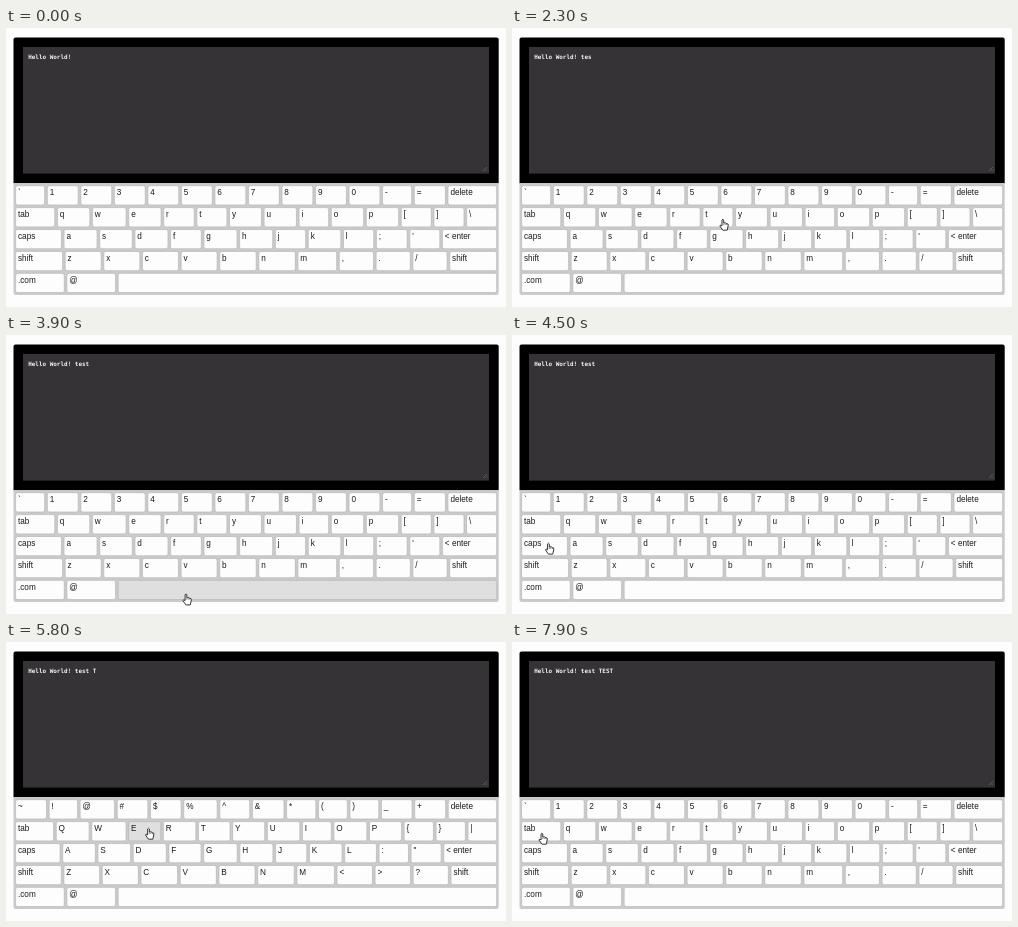
An HTML page with a canvas for the animation above (8 s loop, 500 px wide and 279 px high).

```html
<!DOCTYPE html>
<html lang="en">
<head>
<meta charset="utf-8">
<title>On-screen keyboard</title>
<style>
  html, body { margin: 0; width: 100%; height: 100%; overflow: hidden; background: #fdfdfd; }
  canvas { display: block; width: 500px; height: 279px; }
</style>
</head>
<body>
<canvas id="stage" width="500" height="279"></canvas>
<script>
const ctx = document.getElementById('stage').getContext('2d');
const LOOP = 8000, STEP = 100;
const LEFT = 9.6, TOP = 157.7, SPAN = 483.7, PITCH = 21.9, GAP = 2.6, KEY_H = 19.3;
const LABEL_SIZE = 8.2, KEY_FONT = 'px "Liberation Sans", Arial, sans-serif';

const LOWER = [
  ['`', ...'1234567890-=', 'delete'],
  ['tab', ...'qwertyuiop[]\\'],
  ['caps', ...'asdfghjkl;\'', '< enter'],
  ['shift', ...'zxcvbnm,./', 'shift'],
  ['.com', '@', ' ']
];
const UPPER = [
  ['~', ...'!@#$%^&*()_+', 'delete'],
  ['tab', ...'QWERTYUIOP{}|'],
  ['caps', ...'ASDFGHJKL:"', '< enter'],
  ['shift', ...'ZXCVBNM<>?', 'shift'],
  ['.com', '@', ' ']
];

// Keys take their label width plus an equal share of the spare room;
// the last row has two small keys and a space bar.
function layoutRow(labels, row) {
  ctx.font = LABEL_SIZE * 10 + KEY_FONT;
  let widths = labels.map(label => ctx.measureText(label).width / 10);
  if (row === 4) {
    const small = SPAN * 0.106;
    widths = [small, small, SPAN - 2 * small];
  } else {
    const share = (SPAN - widths.reduce((a, b) => a + b)) / labels.length;
    widths = widths.map(w => w + share);
  }
  let x = LEFT;
  return labels.map((label, i) => {
    const key = { label, x, y: TOP + row * PITCH, w: widths[i] - GAP };
    x += widths[i];
    return key;
  });
}
const layouts = [LOWER, UPPER].map(rows => rows.map(layoutRow).flat());
const findKey = label => layouts.flat().find(key => key.label === label);

const presses = [], stops = [];

function rest(from, to, x, y) {
  stops.push({ t: from, x, y }, { t: to, x, y });
}

function restOnKey(from, to, label, aimX, aimY) {
  const key = findKey(label);
  rest(from, to, key.x + key.w * aimX, key.y + aimY);
}

// Press keys at a steady beat, with the pointer arriving just before each one.
function type(labels, start, beat, aimX, aimY) {
  labels.forEach((label, i) => {
    const at = Math.round((start + beat * i) / STEP) * STEP;
    presses.push({ at, label });
    restOnKey(at - 2 * STEP, at + STEP, label, aimX, aimY);
  });
}

rest(0, 100, 60, 30);
rest(400, 500, 291, 226);
rest(700, 800, 446, 220);
type([...'test'], 1200, 420, 0.55, 11);
rest(3200, 3500, 178, 280);
type([' '], 3900, 0, 0.17, 13);
type(['caps', ...'TEST', 'caps'], 4700, 530, 0.51, 6);
restOnKey(7900, LOOP, 'tab', 0.43, 11);

function stateAt(t) {
  let text = 'Hello World! ', caps = 0, pressed = null;
  for (const { at, label } of presses) {
    if (t < at) break;
    if (t < at + STEP) pressed = label;
    else if (label === 'caps') caps = 1 - caps;
    else text += label;
  }
  return { text, caps, pressed };
}

function pointerAt(t) {
  const next = stops.findIndex(stop => stop.t > t);
  const a = stops[next - 1], b = stops[next];
  const u = (t - a.t) / (b.t - a.t), k = u * u * (3 - 2 * u);
  return [a.x + (b.x - a.x) * k, a.y + (b.y - a.y) * k];
}

function fillRound(x, y, w, h, r, color) {
  ctx.beginPath();
  ctx.roundRect(x, y, w, h, r);
  ctx.fillStyle = color;
  ctx.fill();
}

function drawScreen(text) {
  fillRound(7.5, 9.6, 485.2, 145.6, [2, 2, 0, 0], '#000');
  ctx.fillStyle = '#353335';
  ctx.fillRect(17, 19, 466, 126.6);
  ctx.fillStyle = '#f4f4f4';
  ctx.font = 'bold 5.96px "DejaVu Sans Mono", monospace';
  ctx.fillText(text, 22.2, 31);
  ctx.strokeStyle = '#777';
  ctx.lineWidth = 0.6;
  ctx.beginPath();
  for (const size of [4, 1.5]) {
    ctx.moveTo(481 - size, 143);
    ctx.lineTo(481, 143 - size);
  }
  ctx.stroke();
}

function drawKeys(keys, pressed) {
  fillRound(7.5, 155.2, 485.2, 111.8, [0, 0, 2, 2], '#cbcbcb');
  ctx.font = LABEL_SIZE + KEY_FONT;
  ctx.lineWidth = 0.7;
  ctx.strokeStyle = '#b6b6b6';
  for (const { label, x, y, w } of keys) {
    fillRound(x, y, w, KEY_H, 2, label === pressed ? '#dfdfdf' : '#fdfdfd');
    ctx.stroke();
    ctx.fillStyle = '#1a1a1a';
    ctx.fillText(label, x + 2.4, y + 9.4);
  }
}

function drawHand(x, y) {
  ctx.save();
  ctx.translate(x, y);
  ctx.beginPath();
  ctx.moveTo(2.6, 7.3);
  ctx.lineTo(2.6, 1.4);
  ctx.quadraticCurveTo(3.5, -0.2, 4.3, 1.4);
  ctx.lineTo(4.3, 4.4);
  ctx.quadraticCurveTo(6.5, 3.6, 7.4, 5.2);
  ctx.quadraticCurveTo(8.9, 4.9, 8.9, 6.3);
  ctx.lineTo(7.8, 11.6);
  ctx.lineTo(3.4, 11.6);
  ctx.lineTo(0.5, 7.4);
  ctx.quadraticCurveTo(0.7, 5.5, 2.6, 7.3);
  ctx.closePath();
  ctx.fillStyle = '#fff';
  ctx.fill();
  ctx.strokeStyle = '#222';
  ctx.lineWidth = 0.9;
  ctx.lineJoin = 'round';
  ctx.stroke();
  ctx.beginPath();
  for (let finger = 0; finger < 3; finger++) {
    ctx.moveTo(4.3 + finger * 1.55, 4.9);
    ctx.lineTo(4.3 + finger * 1.55, 6.5);
  }
  ctx.lineWidth = 0.5;
  ctx.stroke();
  ctx.restore();
}

function draw(t) {
  const { text, caps, pressed } = stateAt(t);
  ctx.fillStyle = '#fdfdfd';
  ctx.fillRect(0, 0, 500, 279);
  drawScreen(text);
  drawKeys(layouts[caps], pressed);
  const [x, y] = pointerAt(t);
  if (y > 155) drawHand(x, y);
}

function tick() {
  draw(Math.floor(performance.now() % LOOP / STEP) * STEP);
  requestAnimationFrame(tick);
}
tick();
</script>
</body>
</html>
```
